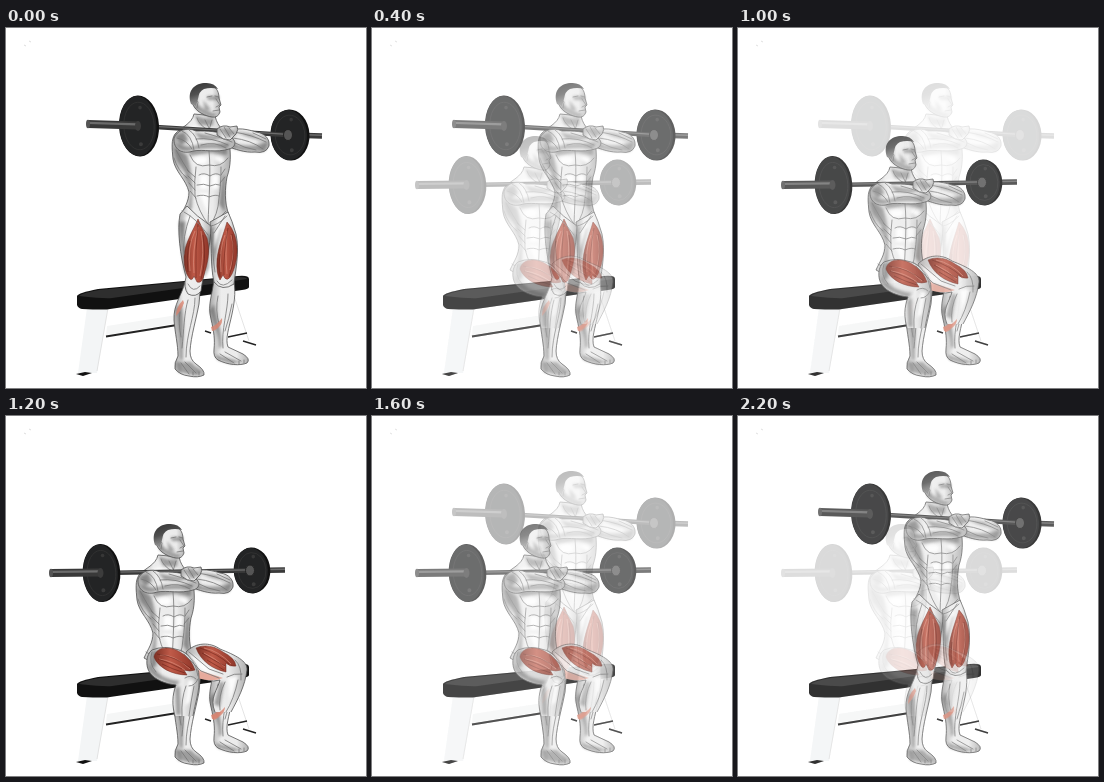
Animation of 360 by 360 pixels, one loop 2.4 s. Source, as an HTML page:

```html
<!DOCTYPE html>
<html lang="en">
<head>
<meta charset="utf-8">
<style>
html, body { margin: 0; width: 100%; height: 100%; overflow: hidden; background: #fff; }
svg { display: block; width: 100vw; height: 100vh; }
.skin { fill: url(#skin); stroke: #555; stroke-width: .8; stroke-linejoin: round; }
.line { fill: none; stroke: #777; stroke-width: .8; stroke-linecap: round; }
.shade { fill: #333; opacity: .42; filter: url(#soft); }
.glow { fill: #fff; opacity: .9; filter: url(#soft); }
.red { fill: url(#red); stroke: #6d2a20; stroke-width: .5; }
.fiber { fill: none; stroke: #e39c8a; stroke-width: .8; opacity: .7; }
.dark { fill: none; stroke: #5d1a12; stroke-width: .8; opacity: .6; }
.faint { fill: #d9836f; opacity: .8; }
</style>
</head>
<body>
<svg id="stage" viewBox="0 0 360 360"></svg>
<script>
const plate = (x, y, rx, ry) => `
  <g transform="translate(${x} ${y}) rotate(-3)">
    <ellipse rx="${rx}" ry="${ry}" fill="#111"/>
    <ellipse cx="-1" rx="${rx - 1.5}" ry="${ry - .5}" fill="#232425"/>
    <ellipse rx="${rx * .76}" ry="${ry * .78}" fill="none" stroke="#343434" stroke-width=".8"/>
    <circle cx="1" cy="${ry * .6}" r="2" fill="#3b3b3b"/>
    <circle cx="2" cy="${-ry * .6}" r="1.8" fill="#373737"/>
  </g>`;

const rod = (x1, y1, x2, y2, w) => `
  <path d="M${x1} ${y1}L${x2} ${y2}" stroke="#393939" stroke-width="${w}"/>
  <path d="M${x1} ${y1 - w * .15}L${x2} ${y2 - w * .15}" stroke="#6c6c6c" stroke-width="${w * .28}"/>`;

// Ends, then the plates: centre and radii
const barbell = ([x1, y1], [x2, y2], [ax, ay, arx, ary], [bx, by, brx, bry]) =>
  rod(bx, by, x2, y2, 5.5) +
  plate(bx, by, brx, bry) +
  rod(ax, ay, bx - 2, by, 4.4) +
  `<ellipse cx="${bx - 2}" cy="${by}" rx="4.5" ry="5.5" fill="#555" stroke="#222"/>` +
  plate(ax, ay, arx, ary) +
  rod(x1, y1, ax - 2, ay - .5, 8) +
  `<ellipse cx="${x1}" cy="${y1}" rx="2" ry="4.2" fill="#555"/>
   <ellipse cx="${ax - 1}" cy="${ay}" rx="3" ry="5" fill="#3c3c3c"/>`;

const defs = `<defs>
  <filter id="soft" x="-50%" y="-50%" width="200%" height="200%"><feGaussianBlur stdDeviation="1.4"/></filter>
  <linearGradient id="skin"><stop stop-color="#a8a8a8"/><stop offset=".3" stop-color="#ededed"/>
    <stop offset=".7" stop-color="#ebebeb"/><stop offset="1" stop-color="#b0b0b0"/></linearGradient>
  <linearGradient id="red"><stop stop-color="#7c3024"/><stop offset=".4" stop-color="#bf5a48"/>
    <stop offset="1" stop-color="#8f3629"/></linearGradient>
  <linearGradient id="hair" x2=".4" y2="1"><stop stop-color="#333"/><stop offset=".5" stop-color="#505050"/>
    <stop offset="1" stop-color="#aaa"/></linearGradient>

  <g id="bench">
    <path d="M81 280H102L91 345H72Z" fill="#f3f5f6"/>
    <path d="M101 298L171 287V295L100 307Z" fill="#f5f6f6"/>
    <path d="M102 280L91 343M226 262L243 313" stroke="#ddd" stroke-width=".8"/>
    <path d="M100 308.5L171 297" stroke="#222" stroke-width="1.8"/>
    <path d="M70 346L79 344L86 345L77 348Z" fill="#111"/>
    <path d="M222 309L241 305M237 313L250 317M199 303L205 305" stroke="#222" stroke-width="1.4"/>
    <path d="M71 268Q72 265 92 261L232 248Q243 247 243 251V259Q243 261 236 262L104 281Q100 282 76 281Q72 280 71 277Z" fill="#111"/>
    <path d="M73 268Q76 265 93 262L232 249Q241 249 241 251L106 270Q100 271 73 268Z" fill="#2e2e2e"/>
    <path d="M18 17l2 1M23 13l2 1" stroke="#ddd"/>
  </g>

  <g id="shins">
    <path class="skin" d="M208 250C207 266 201 276 205 291C208 304 209 312 208 321Q207 329 212 332C222 337 234 338 241 335Q245 331 237 326L222 319C219 311 223 300 226 286C229 272 230 260 227 250Z"/>
    <path class="skin" d="M179 254C176 267 167 277 168 292C169 306 172 316 172 328Q168 335 169 341Q174 347 183 348Q192 350 198 347Q199 342 190 336Q184 332 184 323C185 308 190 292 193 276L195 254Z"/>
    <path class="shade" d="M170 280C172 296 174 313 174 331L177 333C177 312 179 294 176 277ZM204 282C207 297 213 305 213 321L216 318C216 303 211 291 208 276Z"/>
    <path class="shade" d="M170 334L185 334L196 344L190 348L172 344ZM209 327L222 330L236 334L226 336L212 332Z"/>
    <path class="line" stroke-width="1" d="M189 270C189 288 180 306 180 329M182 272C178 285 178 302 176 320M174 284Q172 295 175 309M222 266C222 283 215 302 217 320M226 276Q223 291 219 303M212 268Q209 282 213 296M179 334L190 345M175 335L183 346M187 347V344M193 347V344M219 324L235 333M214 326L228 335M233 336V333M238 335V332"/>
    <path class="faint" d="M205 299Q211 297 216 290Q217 295 213 299Q209 303 206 303Z"/>
  </g>

  <g id="torso">
    <path class="skin" d="M188 86C186 96 175 99 169 106C165 112 166 120 167 131C169 144 180 151 183 164C183 174 178 180 174 189L200 203L223 187C218 174 219 160 221 149C225 138 225 126 223 112C219 101 212 101 209 88Z"/>
    <path class="shade" d="M168 119C170 138 180 149 184 164L181 186L186 180C187 158 187 143 181 127ZM181 120L221 121L221 127L204 125L184 128ZM217 145L213 176L219 184L219 150ZM188 86Q199 92 208 90L207 98L193 97Z"/>
    <path class="glow" d="M188 130Q197 126 202 131L199 136L189 136ZM207 130Q213 126 219 131L216 136ZM194 147H202V161H194ZM206 147H213L212 161H206ZM171 133L180 147L177 148ZM193 165H202L203 188ZM176 104L188 98L200 102L184 108Z"/>
    <path class="line" stroke="#444" d="M184 127Q189 141 203 137Q215 140 222 130M203 123C205 145 203 167 202 197M190 139Q188 153 189 168Q193 184 202 196M215 139Q215 158 213 170Q212 187 204 197M193 147Q198 144 204 148Q210 144 214 147M191 157Q198 155 204 158Q210 155 214 157M191 168Q198 166 203 169Q210 166 213 168M181 142L189 149M182 148L189 155M183 155L189 162M184 163L190 170M219 141L215 147M219 149L214 155M170 122Q177 135 183 144M168 130Q172 143 181 150M176 183Q188 189 202 199M220 183Q212 192 204 198M191 90Q193 97 202 102M206 92L203 102M199 92L203 100"/>
    <path class="skin" d="M186 72C185 61 192 56 200 56C209 57 213 62 213 70L215 77L213 79L214 84Q212 90 206 89C199 88 192 84 189 80Q186 77 186 72Z"/>
    <path d="M185 76C181 64 187 56 198 55Q208 54 212 61Q205 59 198 61Q193 63 192 71L190 78Z" fill="url(#hair)"/>
    <path class="shade" d="M190 75L199 82L211 86L207 90Q196 88 189 80ZM201 68H213L213 72L202 72ZM197 72L205 82L199 82Z"/>
    <path class="line" d="M188 74Q190 70 192 74L191 80M201 69L206 68M209 68L213 69M207 83L213 82M210 71L214 77L210 79" stroke="#333"/>
  </g>

  <g id="arms">
    <path class="skin" d="M219 106C226 99 238 100 250 104C259 105 264 111 263 118Q260 126 249 124C239 125 229 121 220 118Z"/>
    <path class="shade" d="M223 114Q242 121 262 114L259 123Q239 125 223 119ZM228 103L246 106L258 113L240 108Z"/>
    <path class="line" stroke="#444" d="M228 104Q247 107 260 114M227 110Q245 112 257 121M229 115Q238 120 250 122M247 105L260 111"/>
    <path class="skin" d="M168 110C171 102 181 99 190 103C202 103 212 103 222 108C231 111 231 119 223 121C211 125 197 121 187 123C176 127 167 121 168 110Z"/>
    <path class="shade" d="M170 115Q182 122 194 116L224 115L221 121Q196 119 184 123Q173 124 170 115ZM188 104Q206 109 220 108L210 112L194 111ZM170 108L178 104L182 112L175 117Z"/>
    <path class="line" stroke="#444" d="M176 103Q186 107 188 122M171 110Q181 112 186 121M183 102Q191 107 193 120M190 111Q206 109 222 117M195 117Q209 113 220 120M199 105Q211 108 226 114"/>
    <path class="skin" d="M211 101Q217 96 224 99L231 98Q233 101 230 106L224 112Q217 112 211 107Z"/>
    <path class="shade" d="M213 101L222 99L230 105L222 110Z"/>
    <path class="line" stroke="#333" d="M218 99L224 109M223 100L228 106M214 101L220 110"/>
  </g>

  <g id="standLegs">
    <path class="skin" d="M204 194C206 215 204 237 208 254Q216 264 228 256C229 245 234 224 230 206Q226 192 222 184Z"/>
    <path class="skin" d="M174 186C171 202 174 227 180 249Q177 259 182 266Q190 270 195 263C197 246 205 218 205 198Q190 188 181 178Z"/>
    <path class="shade" d="M173 194L178 242L182 250L180 208L186 193ZM201 203L198 251L203 240L205 209ZM205 200L208 240L211 220L215 200Z"/>
    <path class="glow" d="M180 188L190 192L182 208L178 220ZM208 202L217 194L211 213L208 222Z"/>
    <path class="red" d="M192 191C187 203 179 214 178 229Q178 243 183 250Q186 254 188 248L191 254Q196 256 198 247C201 237 205 224 201 210Q196 200 192 191Z"/>
    <path class="red" d="M221 194C217 208 213 216 211 231Q210 246 214 252L217 247Q221 256 226 246C231 235 233 221 229 208Q226 199 221 194Z"/>
    <path class="fiber" d="M189 203Q181 219 184 243M192 199Q186 224 188 245M195 203Q199 224 194 248M219 207Q213 221 215 244M221 203Q219 228 221 246M225 207Q230 223 224 242"/>
    <path class="dark" stroke-width="1.2" d="M192 196Q189 222 190 250M197 207Q201 232 195 251M222 200Q217 228 218 247M226 206Q230 230 223 249M184 213Q180 226 182 244M214 226Q212 238 214 249"/>
    <path class="line" stroke="#444" d="M178 184Q190 190 202 207M184 188Q176 210 178 226M204 198Q211 198 221 188M207 204Q206 226 209 244M182 256Q187 266 194 258M211 253Q216 262 226 252M219 188L208 205"/>
    <path class="faint" opacity=".5" d="M177 272Q170 279 170 288Q175 283 178 275Z"/>
  </g>

  <g id="sitLegs">
    <path class="skin" d="M209 296C203 282 212 273 214 264Q202 268 186 256L180 236C190 226 204 226 214 233C229 239 242 245 241 254C239 270 232 283 225 296"/>
    <path d="M190 253L217 262Q205 267 189 261Z" fill="#e6aa9c"/>
    <path class="skin" d="M169 300C166 289 166 280 170 269C160 268 149 264 144 257C139 250 140 238 146 234Q158 229 173 234C186 239 193 249 193 261C194 275 189 287 187 300"/>
    <path class="shade" d="M142 248Q155 263 174 265L170 270Q146 264 142 248ZM169 272L170 299L175 299L174 270ZM214 266L208 288L214 291L218 266ZM146 236L152 233L150 250L145 252Z"/>
    <path class="glow" d="M181 237L190 241L210 258L194 254ZM182 264L188 264L184 286L179 290ZM222 262L232 260L224 286Z"/>
    <path class="red" d="M148 241C150 230 164 230 174 236Q185 242 189 254Q184 256 178 254L181 259C167 259 152 252 148 241Z"/>
    <path class="red" d="M190 232C198 228 209 230 217 236Q229 242 230 250Q224 251 220 247L220 256C206 253 195 245 190 232Z"/>
    <path class="fiber" d="M154 239Q168 238 184 253M153 243Q167 245 179 254M198 232Q213 235 225 248M198 237Q209 242 219 251"/>
    <path class="dark" stroke-width="1.3" d="M151 238Q169 240 186 253M152 243Q164 247 176 253M156 248Q166 253 179 257M194 232Q212 238 223 248M196 237Q207 244 219 250M201 244L218 254"/>
    <path class="line" stroke="#444" d="M175 234Q190 243 192 260M179 262Q185 258 190 263M183 270Q189 270 192 263M146 236Q142 247 150 256M178 238L195 255L213 262M183 236L203 253L217 258M229 244Q236 250 235 264M221 261Q228 257 236 258M232 264Q228 283 220 296M188 270Q185 285 183 300M180 270Q175 283 176 300M219 266Q212 280 214 294"/>
    <path class="faint" d="M206 300Q213 298 219 291Q219 296 214 300Q210 304 207 304Z"/>
  </g>
</defs>`;

const pose = (id, legs, shift, bar) => `<g id="${id}">
  <use href="#bench"/><use href="#shins"/>
  <use href="#torso" transform="translate(${shift})"/>
  <use href="#${legs}"/>${bar}
  <use href="#arms" transform="translate(${shift})"/>
</g>`;

stage.innerHTML = defs +
  pose("stand", "standLegs", "0 0", barbell([82, 96], [316, 108], [133, 98, 20, 30.5], [284, 107, 19.5, 25.5])) +
  pose("sit", "sitLegs", "-36 53", barbell([45, 157], [279, 154], [95.5, 157, 18.8, 29], [246, 154.5, 18.3, 23]));

const stand = document.getElementById("stand");
const sit = document.getElementById("sit");

// The poses dissolve into each other over white, six steps each way
function draw(now) {
  const step = Math.floor(now / 200) % 12;
  const seated = 1 - Math.abs(step - 6) / 6;
  stand.setAttribute("opacity", 1 - seated);
  sit.setAttribute("opacity", seated);
  requestAnimationFrame(draw);
}
draw(0);
</script>
</body>
</html>
```
